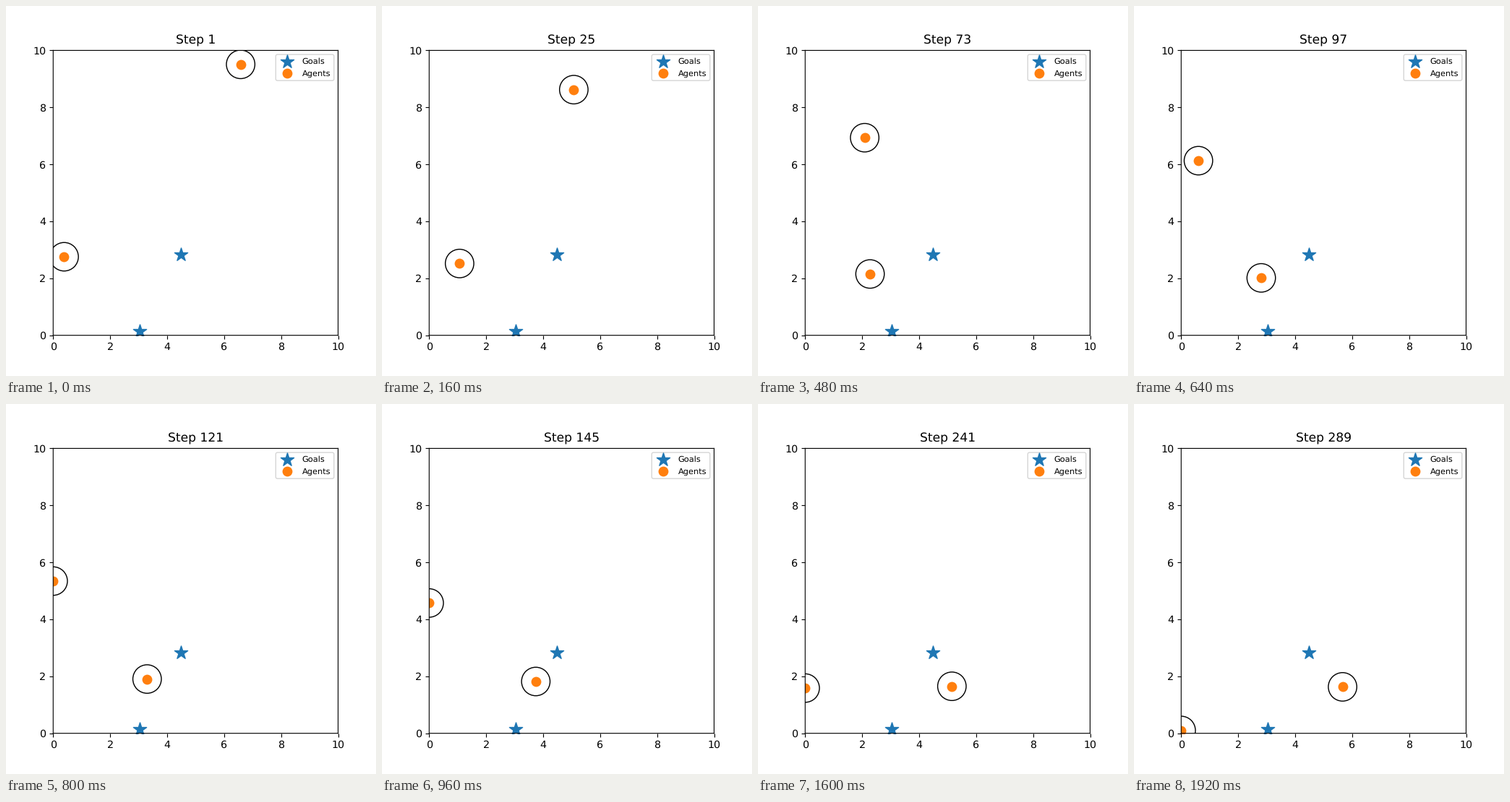
A matplotlib script for the animation above (2000 ms loop, 512 px wide and 512 px high).

```python
import numpy as np
import matplotlib.pyplot as plt
from matplotlib.animation import FuncAnimation
from numpy.polynomial import Polynomial as Poly

FRAMES = 25
STRIDE = 12
RADIUS = 0.5

GOALS = [(4.47, 2.84), (3.04, 0.14)]

# Smooth x and y curves of each agent over one loop, u = 0..1.
PATHS = [
    (Poly([6.58, -18.09, 0.5]), Poly([9.51, -10.85, 2.47, -1.03])),
    (Poly([0.385, 8.51, -3.95, 0.72]), Poly([2.757, -3.07, 2.83, -0.887])),
]


def positions(i):
    """Agent positions, held inside the walls."""
    u = i / (FRAMES - 1)
    return np.clip([(x(u), y(u)) for x, y in PATHS], 0, 10)


plt.rcParams["text.hinting"] = "none"

fig, ax = plt.subplots(figsize=(5, 5), dpi=102.4)
ax.set(xlim=(0, 10), ylim=(0, 10), aspect="equal")

ax.scatter(*zip(*GOALS), marker="*", s=180, color="tab:blue", label="Goals")
agents = ax.scatter(*positions(0).T, s=76, color="tab:orange", label="Agents")
rings = [ax.add_patch(plt.Circle(p, RADIUS, fill=False)) for p in positions(0)]
title = ax.set_title("Step 1")
ax.legend(loc="upper right", fontsize=8)

# Keep sub-pixel placement for spines, ticks and markers.
for artist in ax.findobj():
    artist.set_snap(False)


def update(i):
    pts = positions(i)
    agents.set_offsets(pts)
    for ring, p in zip(rings, pts):
        ring.center = p
    title.set_text(f"Step {1 + STRIDE * i}")
    return [agents, title, *rings]


anim = FuncAnimation(fig, update, frames=FRAMES, interval=80,
                     repeat=True, repeat_delay=0, blit=False)
plt.show()
```
